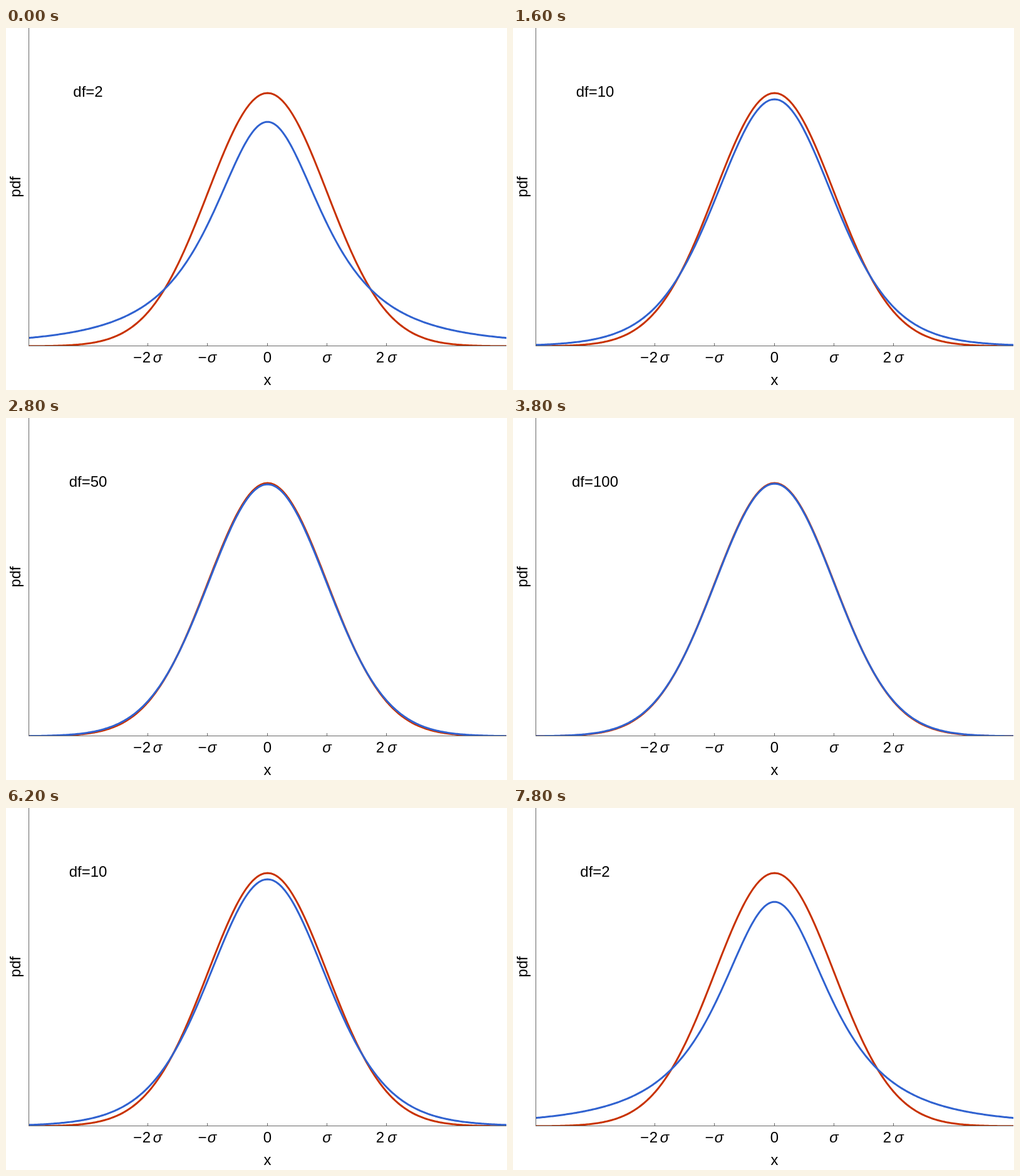
An HTML page that plays this animation: 800x579 px, repeating every 8000 ms.

```html
<!DOCTYPE html>
<html lang="en">
<head>
<meta charset="utf-8">
<title>t distribution approaching the normal</title>
<style>
  html, body { margin: 0; width: 100%; height: 100%; overflow: hidden; background: #fff; }
  svg { display: block; width: 800px; height: 579px; }
  text { font: 24px "Liberation Sans", Arial, sans-serif; text-anchor: middle; fill: #000; }
  .sigma { font-style: italic; }
  .curve { fill: none; stroke-width: 3; stroke-linejoin: round; }
  .axes { fill: none; stroke: #666; stroke-width: 1; }
</style>
</head>
<body>
<svg viewBox="0 0 800 579">
  <clipPath id="plot"><rect x="36" y="0" width="763" height="509"/></clipPath>
  <g clip-path="url(#plot)">
    <path id="normal" class="curve" stroke="#c83200"/>
    <path id="student" class="curve" stroke="#3062d0"/>
  </g>
  <path class="axes" d="M36.5 0V508.5H799M226.5 508v-4M321.5 508v-4M417.5 508v-4M512.5 508v-4M607.5 508v-4"/>
  <text id="label" x="131" y="110"></text>
  <text transform="translate(23 254) rotate(-90)">pdf</text>
  <text x="417.5" y="571">x</text>
  <text x="210" y="535">−</text>
  <text x="224.5" y="535">2</text>
  <text x="242" y="535" class="sigma">σ</text>
  <text x="313.5" y="535">−</text>
  <text x="329" y="535" class="sigma">σ</text>
  <text x="417.5" y="535">0</text>
  <text x="512.5" y="535" class="sigma">σ</text>
  <text x="597.5" y="535">2</text>
  <text x="616.5" y="535" class="sigma">σ</text>
</svg>
<script>
  const STEP = 200;
  const DEGREES = [2, 3, 4, 5, 6, 7, 8, 9, 10, 15, 20, 25, 30, 40, 50, 60, 70, 80, 90, 100];
  const COUNT = DEGREES.length;
  const CENTER = 417.6, SIGMA = 95.3, BASE = 509, SCALE = 1015;
  const byId = id => document.getElementById(id);

  const normalPdf = x => Math.exp(-x * x / 2) / Math.sqrt(2 * Math.PI);

  function studentPdf(df) {
    // gamma((df + 1) / 2) / gamma(df / 2) by recurrence
    let ratio = 1 / Math.sqrt(Math.PI);
    for (let n = 1; n < df; n++) ratio = n / 2 / ratio;
    const peak = ratio / Math.sqrt(df * Math.PI);
    return x => peak * Math.pow(1 + x * x / df, -(df + 1) / 2);
  }

  function plot(pdf) {
    const points = [];
    for (let i = -205; i <= 205; i++) {
      const x = i / 50;
      points.push((CENTER + x * SIGMA).toFixed(2) + " " + (BASE - SCALE * pdf(x)).toFixed(2));
    }
    return "M" + points.join("L");
  }

  let shown;
  function draw(now) {
    const step = Math.floor(now / STEP) % (2 * COUNT);
    const df = DEGREES[Math.min(step, 2 * COUNT - 1 - step)];
    if (df !== shown) {
      byId("student").setAttribute("d", plot(studentPdf(df)));
      byId("label").textContent = "df=" + df;
      shown = df;
    }
  }

  function tick() {
    draw(performance.now() - start);
    requestAnimationFrame(tick);
  }

  byId("normal").setAttribute("d", plot(normalPdf));
  const start = performance.now();
  tick();
</script>
</body>
</html>
```
